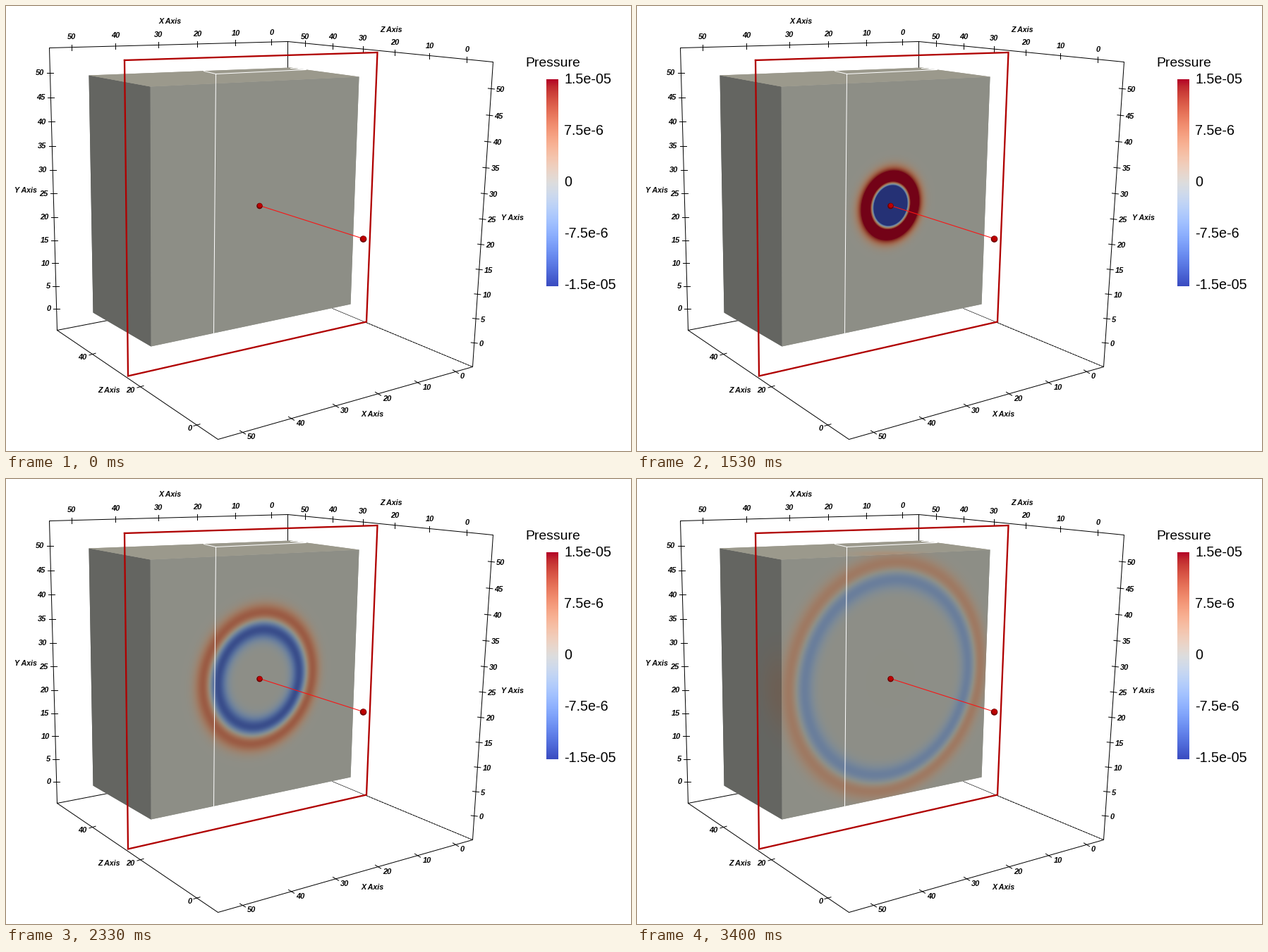
A matplotlib script for the animation above (3.47 s loop, 886x632 px).

```python
import numpy as np
import matplotlib.pyplot as plt
from matplotlib.animation import FuncAnimation
from matplotlib.patches import Circle, Polygon

W, H, DPI = 886, 632, 64
PT = 72 / DPI  # points per pixel
STEPS, SUB, LOOP_MS = 52, 4, 3470  # the field moves once per SUB frames
FRAMES = STEPS * SUB
COOLWARM = plt.get_cmap("coolwarm", 1024)

fig = plt.figure(figsize=(W / DPI, H / DPI), dpi=DPI, facecolor="white")
ax = fig.add_axes([0, 0, 1, 1])
ax.axis("off")


def line(points, color="black", width=1.0, z=1, **style):
    xs, ys = zip(*points)
    ax.plot(xs, ys, color=color, lw=width * PT, zorder=z, **style)


def label(x, y, text, size=11, ha="center", weight="bold", style="italic"):
    ax.text(x, y + 0.36 * size, text, fontsize=size * PT, ha=ha, va="baseline",
            family="Liberation Sans", weight=weight, style=style, zorder=8)


def tick(x, y, dx, dy):
    line([(x - dx, y - dy), (x + dx, y + dy)])


def on_edge(a, b, x=None, y=None):
    """Point of the line a-b at a given x or y."""
    t = (x - a[0]) / (b[0] - a[0]) if y is None else (y - a[1]) / (b[1] - a[1])
    return a[0] + t * (b[0] - a[0]), a[1] + t * (b[1] - a[1])


def unproject(quad, corners, x, y):
    """Map screen points to plane coordinates, quad going to corners."""
    rows, rhs = [], []
    for (px, py), (u, v) in zip(quad, corners):
        rows += [[px, py, 1, 0, 0, 0, -u * px, -u * py],
                 [0, 0, 0, px, py, 1, -v * px, -v * py]]
        rhs += [u, v]
    h = np.linalg.solve(np.array(rows, float), np.array(rhs, float))
    w = h[6] * x + h[7] * y + 1
    return (h[0] * x + h[1] * y + h[2]) / w, (h[3] * x + h[4] * y + h[5]) / w


def pressure(r, step):
    """Outgoing spherical pulse, scaled so that 1 is the top of the legend."""
    front = 4.45 + 0.62 * (step - 23)
    s = (r - front) / 1.75
    soft = np.sqrt(r * r + 1)
    return 7 / soft * (1 + 15 / soft**2) * s * np.exp(0.5 - s * s / 2)


class Face:
    """One lit side of the block, coloured by pressure."""

    def __init__(self, quad, corners, offset, tint):
        self.tint = np.array(tint)
        x0, y0 = np.min(quad, axis=0)
        x1, y1 = np.max(quad, axis=0)
        x, y = np.meshgrid(np.arange(x0, x1 + 1), np.arange(y0, y1 + 1))
        u, v = unproject(quad, corners, x, y)
        self.r = np.sqrt(u * u + v * v + offset**2)
        patch = Polygon(quad, fc=self.colors(np.zeros(1))[0], lw=0, zorder=2)
        ax.add_patch(patch)
        self.image = ax.imshow(self.colors(self.r * 0), aspect="auto", zorder=3,
                               interpolation="nearest",
                               extent=(x0 - 0.5, x1 + 0.5, y1 + 0.5, y0 - 0.5))
        self.image.set_clip_path(patch)

    def colors(self, value):
        return COOLWARM(0.5 + 0.5 * np.clip(value, -1, 1))[..., :3] * self.tint

    def update(self, step):
        self.image.set_data(self.colors(pressure(self.r, step)))


# Block corners on screen: front (f) and back (b), left/right, top/bottom.
flt, frt, frb, flb = (204, 114), (500, 100), (488, 423), (205, 483)
blt, brt, blb = (117, 98), (403, 87), (123, 435)
faces = [
    Face([flt, frt, frb, flb], [(-25, 25), (25, 25), (25, -25), (-25, -25)],
         0, (0.643, 0.647, 0.612)),
    Face([blt, flt, flb, blb], [(25, 25), (0, 25), (0, -25), (25, -25)],
         25, (0.455, 0.459, 0.442)),
    Face([blt, brt, frt, flt], [(-25, 25), (25, 25), (25, 0), (-25, 0)],
         25, (0.706, 0.695, 0.637)),
]

# Axes box
top_l, top_m, top_r = (61, 59), (399, 50), (690, 79)
low_l, low_m, low_r = (72, 460), (300, 615), (661, 512)
line([low_l, top_l, top_m, top_r, low_r, low_m, low_l])
line([top_m, (399, 88)])
line([low_l, (144, 446)])
line([(462, 429), low_r], width=0.6)
line([(510, 449), low_r], width=0.8, ls=(0, (3, 2)))

for j in range(11):
    x, y = on_edge(top_l, low_l, y=429 - 31.8 * j - 0.17 * j * j)
    tick(x, y, 4.5, 0)
    label(x - 8, y - 0.5, str(5 * j), ha="right")
    x, y = on_edge(top_r, low_r, y=478 - 34.2 * j - 0.19 * j * j)
    tick(x, y, 4.5, 0.5)
    label(x + 7, y + 0.5, str(5 * j), ha="left")

tens = range(50, -1, -10)
for n, x, y in zip(tens, (93, 155, 216, 271, 325, 376), (43, 41, 40, 39, 38, 37)):
    tick(*on_edge(top_l, top_m, x=x), 0, 4)
    label(x, y, str(n))
for n, x, y in zip(tens, (424, 463, 506, 551, 600, 653), (43, 43, 45, 51, 56, 61)):
    tick(*on_edge(top_m, top_r, x=x), 0, 4)
    label(x, y, str(n))
for n, x in zip(tens, (335, 404, 467, 527, 583, 637)):
    x, y = on_edge(low_m, low_r, x=x)
    tick(x, y, 4, 2.4)
    label(x + (13 if n else 9), y + 6, str(n))
for n, x in zip((40, 20, 0), (122, 190, 270)):
    x, y = on_edge(low_l, low_m, x=x)
    tick(x, y, 4.5, -1.3)
    label(x - (14.5 if n else 10), y + 4, str(n))

for name, x, y in [("X", 232, 21), ("Z", 546, 33), ("Y", 27, 261),
                   ("Y", 717, 300), ("Z", 146, 545), ("X", 519, 579)]:
    label(x, y, name + " Axis", size=10.6)

# Outline of the uncut volume
line([(280, 92), (297, 96), (294, 464)], "white", z=4)
line([(297, 96), (425, 90), (403, 88)], "white", z=4)

# Cutting plane and its normal
plane = [(167.5, 76.5), (526, 65.5), (510.5, 448), (172.5, 525)]
line(plane + plane[:1], "#b00000", 2.3, z=5, solid_joinstyle="miter")
line([(359, 283), (506, 330)], "#fa1414", 1.1, z=6)
for x, y, r in [(359, 283.5, 4.3), (506, 330.5, 4.8)]:
    ax.add_patch(Circle((x, y), r, fc="#6e0000", lw=0, zorder=7))
    ax.add_patch(Circle((x + 0.4, y - 0.6), r - 1.2, fc="#be0000", lw=0, zorder=7))

# Legend
ramp = COOLWARM(np.linspace(1, 0, 294))[:, None, :3]
ax.imshow(ramp, extent=(765.5, 782.5, 397.5, 103.5), aspect="auto", zorder=2)
legend = dict(ha="left", weight="normal", style="normal")
label(736, 79, "Pressure", 19.4, **legend)
for i, text in enumerate(["1.5e-05", "7.5e-6", "0", "-7.5e-6", "-1.5e-05"]):
    label(791, 102 + 73.2 * i, text, 19.8, **legend)

ax.set_xlim(-0.5, W - 0.5)
ax.set_ylim(H - 0.5, -0.5)


def update(frame):
    step = min((frame + 1) // SUB, STEPS - 1)
    for face in faces:
        face.update(step)
    return [face.image for face in faces]


anim = FuncAnimation(fig, update, frames=FRAMES, interval=LOOP_MS / FRAMES,
                     init_func=lambda: update(0), repeat=True, repeat_delay=0)
plt.show()
```
